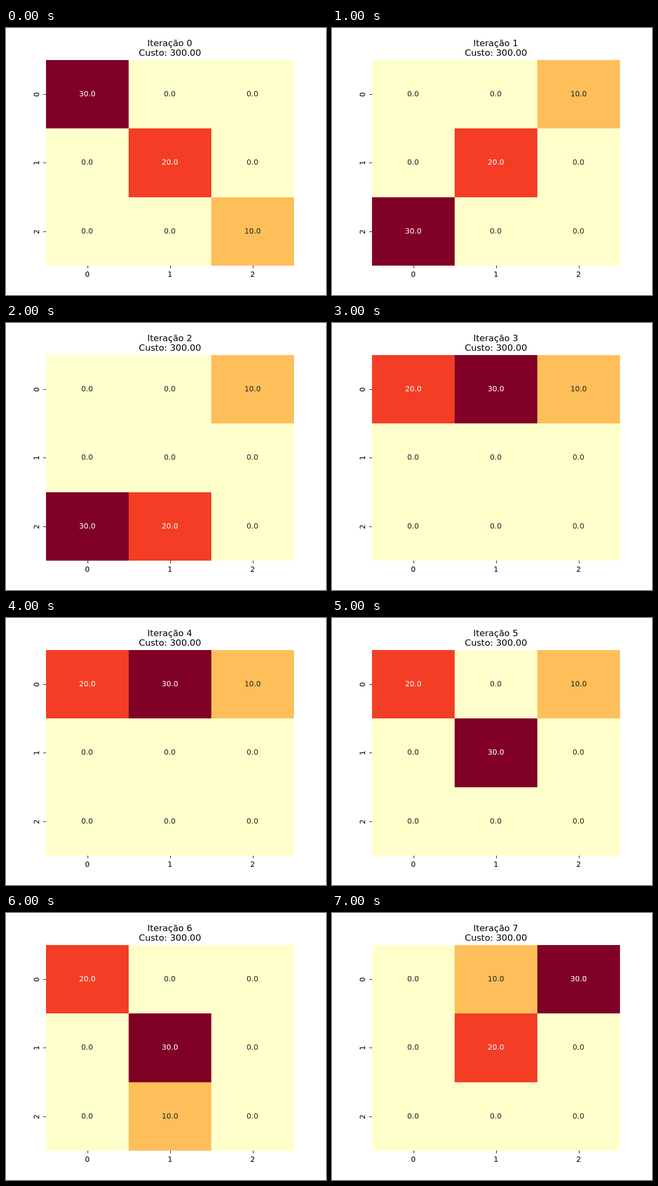
Write an HTML page with a canvas that moves like this. It is 600x500 px and loops after 8 s.

```html
<!DOCTYPE html>
<html lang="pt">
<head>
<meta charset="utf-8">
<style>
  html, body { margin: 0; overflow: hidden; background: #fff; }
  canvas { display: block; }
</style>
</head>
<body>
<canvas id="stage" width="600" height="500"></canvas>
<script>
const ctx = document.getElementById('stage').getContext('2d');
const STEP = 1000;
const FILL = ['#ffffcc', '#febf5a', '#f43d25', '#800026'];
const ROW_EDGES = [60, 188, 317, 445];

// One 3x3 matrix per iteration, row by row, in tens.
const STATES = [
  '300020001', '001020300', '001000320', '231000000',
  '231000000', '201030000', '200030010', '013020000',
];

function centered(text, x, baseline, size, color) {
  ctx.font = `${size}px "DejaVu Sans", sans-serif`;
  ctx.fillStyle = color;
  ctx.fillText(text, Math.floor(x - ctx.measureText(text).width / 2), baseline);
}

function drawAxes() {
  for (let i = 0; i < 3; i++) {
    const x = 152.5 + 155 * i;
    const y = [124, 252, 381][i];
    ctx.fillStyle = '#000';
    ctx.fillRect(x + 0.5, 445, 1, 5);
    ctx.fillRect(70, y, 5, 1);
    centered(i, x, 466, 13.89, '#000');
    ctx.save();
    ctx.translate(62, y + 5);
    ctx.rotate(-Math.PI / 2);
    ctx.fillText(i, 0, 0);
    ctx.restore();
  }
}

function drawCell(value, row, col) {
  const x = 75 + 155 * col;
  const top = ROW_EDGES[row];
  ctx.fillStyle = FILL[value];
  ctx.fillRect(x, top, 155, ROW_EDGES[row + 1] - top);
  centered((value * 10).toFixed(1), x + 77.5, top + 68, 13.89, value > 1 ? '#fff' : '#262626');
}

function draw(iteration) {
  ctx.fillStyle = '#fff';
  ctx.fillRect(0, 0, 600, 500);
  centered(`Iteração ${iteration}`, 307.5, 34, 16.67, '#000');
  centered('Custo: 300.00', 307.5, 52, 16.67, '#000');
  [...STATES[iteration]].forEach((v, i) => drawCell(+v, Math.floor(i / 3), i % 3));
  drawAxes();
}

function tick() {
  draw(Math.floor(performance.now() / STEP) % STATES.length);
  requestAnimationFrame(tick);
}
tick();
</script>
</body>
</html>
```
